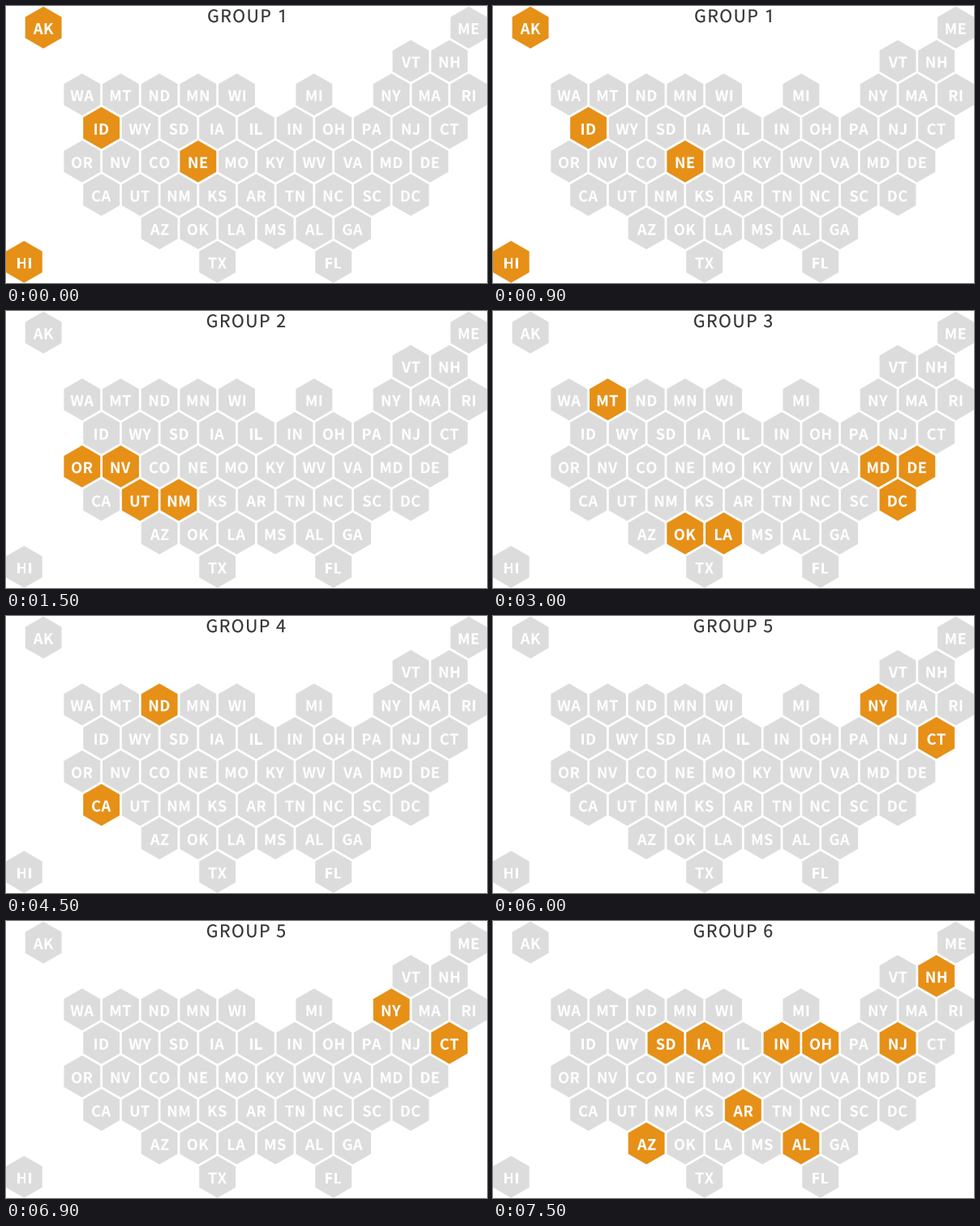
Write a matplotlib script that moves like this. It is 593 px wide and 342 px high and loops after 8 s.

```python
import matplotlib.pyplot as plt
from matplotlib.animation import FuncAnimation
from matplotlib.patches import PathPatch, RegularPolygon
from matplotlib.path import Path
from matplotlib.textpath import TextPath

W, H, DPI = 593, 342, 100
STEP_MS, FRAMES, HOLD = 500, 16, 3   # each group holds for three steps
GREY, ORANGE, INK = "#dcdcdc", "#e69017", "#333333"
X0, Y0 = 22.3, 26.6                  # centre of the top-left grid slot
DX, DY, RADIUS = 23.835, 41.33, 25.9  # half column, row pitch, hexagon radius
FONT = "Noto Sans CJK JP"

# Each row: (first half-column, states two half-columns apart; "-" is a gap)
ROWS = [
    (1, "AK - - - - - - - - - - ME"),
    (20, "VT NH"),
    (3, "WA MT ND MN WI - MI - NY MA RI"),
    (4, "ID WY SD IA IL IN OH PA NJ CT"),
    (3, "OR NV CO NE MO KY WV VA MD DE"),
    (4, "CA UT NM KS AR TN NC SC DC"),
    (7, "AZ OK LA MS AL GA"),
    (0, "HI - - - - TX - - FL"),
]
GROUPS = [set(g.split()) for g in (
    "AK HI ID NE",
    "OR NV UT NM",
    "MT MD DE DC OK LA",
    "ND CA",
    "NY CT",
    "NH SD IA IN OH NJ AR AZ AL",
)]

# Plain numeral one without a foot, on a 100-unit em
ONE = Path([(12, 56), (12, 64), (35, 73), (38, 73), (38, 0), (29, 0),
            (29, 62), (12, 56)], closed=True)


def glyphs(text, weight):
    return TextPath((0, 0), text, size=100,
                    prop={"family": FONT, "weight": weight})


def ink_width(text, weight):
    return glyphs(text, weight).get_extents().width


def advance(char, weight):
    return ink_width(f"|{char}|", weight) - ink_width("||", weight)


def lettering(text, x, y, cap, stem, weight, spacing, color):
    """Tracked text centred on (x, y), sized by cap height and stem in pixels."""
    bar = glyphs("I", weight).get_extents()
    scale = cap / bar.height
    stroke = max(0, stem - bar.width * scale)
    scale = (cap - stroke) / bar.height
    pen, parts = 0, []
    for char in text:
        if char != " ":
            shape = ONE if char == "1" else glyphs(char, weight)
            parts.append(Path(shape.vertices * scale + (pen, 0), shape.codes))
        pen += advance(char, weight) * scale + spacing
    path = Path.make_compound_path(*parts)
    # Measure each letter, since closing points may sit at the origin
    boxes = [p.get_extents() for p in parts]
    middle = (min(b.x0 for b in boxes) + max(b.x1 for b in boxes)) / 2
    verts = (path.vertices - (middle, (cap - stroke) / 2)) * (1, -1) + (x, y)
    return PathPatch(Path(verts, path.codes), facecolor=color,
                     edgecolor=color if stroke else "none",
                     linewidth=stroke * 72 / DPI, joinstyle="miter", zorder=3)


fig = plt.figure(figsize=(W / DPI, H / DPI), dpi=DPI, facecolor="white")
ax = fig.add_axes([0, 0, 1, 1])
ax.set(xlim=(0, W), ylim=(H, 0))
ax.axis("off")

tiles = {}
for row, (first, names) in enumerate(ROWS):
    for i, name in enumerate(names.split()):
        if name == "-":
            continue
        x, y = X0 + DX * (first + 2 * i), Y0 + DY * row
        tiles[name] = ax.add_patch(
            RegularPolygon((x, y), 6, radius=RADIUS, facecolor=GREY, linewidth=0))
        ax.add_patch(lettering(name, x, y + 1.4, 13.6, 2.8, "bold", 0.4, "white"))

titles = [
    ax.add_patch(lettering(f"GROUP {n + 1}", 296, 12.2, 15.8, 2.2,
                           "normal", 1.5, INK))
    for n in range(len(GROUPS))
]


def draw(frame):
    group = frame // HOLD
    for name, tile in tiles.items():
        tile.set_facecolor(ORANGE if name in GROUPS[group] else GREY)
    for n, title in enumerate(titles):
        title.set_visible(n == group)
    return [*tiles.values(), *titles]


anim = FuncAnimation(fig, draw, frames=FRAMES, interval=STEP_MS,
                     repeat=True, repeat_delay=0)
plt.show()
```
